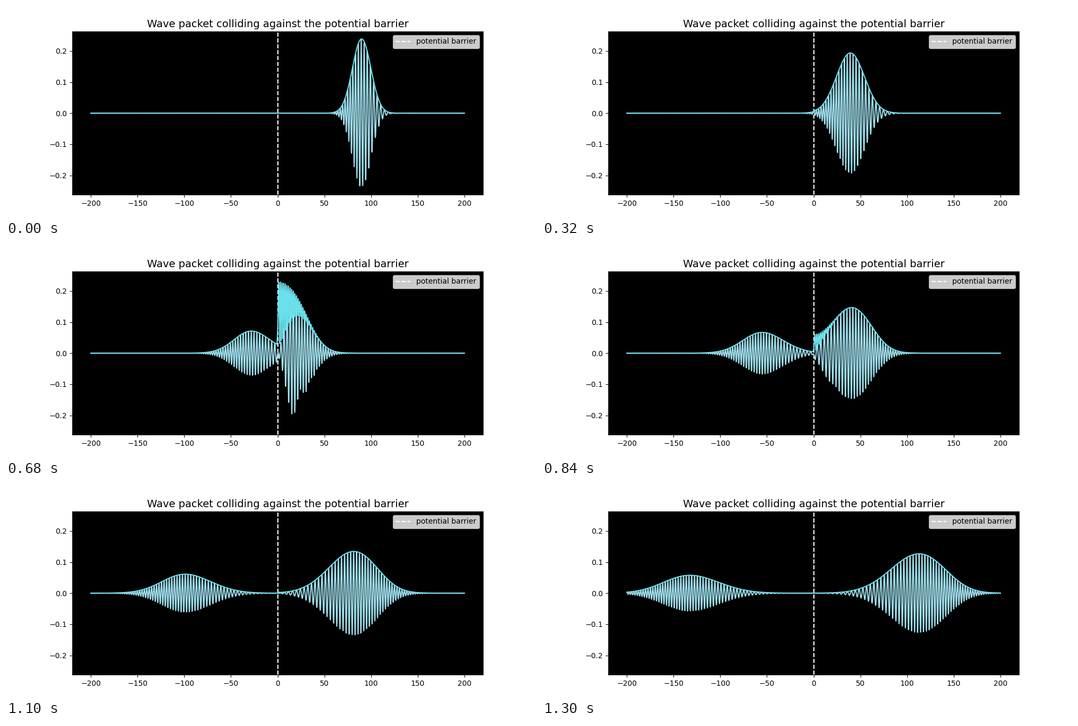
A matplotlib script that plays this animation: 1000x400 px, repeating every 1.32 s.

```python
import numpy as np
import matplotlib.pyplot as plt
from matplotlib.animation import FuncAnimation

FRAMES, INTERVAL = 66, 20

# Packet: start point, mean wave number, variance, overall phase (hbar = m = 1)
X0, K0, VAR, PHASE = 170.0, 2.0, 10.4, 1.28
T_START, DT = 40.0, 1.58
# Square barrier on [-HALF, HALF]
HALF, HEIGHT = 1.0, 2.15


def scattering_states(x, k):
    """Stationary states for waves arriving from the right, one column per k."""
    kappa = np.sqrt(2 * HEIGHT - k**2 + 0j)
    c, s = np.cosh(2 * kappa * HALF), np.sinh(2 * kappa * HALF)
    trans = np.exp(-2j * k * HALF) / (c + 0.5j * (kappa / k - k / kappa) * s)
    refl = -0.5j * trans * (kappa / k + k / kappa) * s

    x = x[:, None]
    depth = np.clip(x, -HALF, HALF) + HALF
    right = np.exp(-1j * k * x) + refl * np.exp(1j * k * x)
    left = trans * np.exp(-1j * k * x)
    inside = trans * np.exp(1j * k * HALF) * (
        np.cosh(kappa * depth) - 1j * k / kappa * np.sinh(kappa * depth))
    return np.where(x > HALF, right, np.where(x < -HALF, left, inside))


x = np.linspace(-200, 200, 2001)
k = np.linspace(1.0, 3.0, 480)
states = scattering_states(x, k)
weights = ((2 * VAR / np.pi) ** 0.25 / np.sqrt(2 * np.pi) * (k[1] - k[0])
           * np.exp(-VAR * (k - K0) ** 2 + 1j * (k * X0 + PHASE)))


def wave(frame):
    t = T_START + DT * frame
    return states @ (weights * np.exp(-0.5j * k**2 * t))


fig, ax = plt.subplots(figsize=(10, 4), dpi=100)
ax.set_facecolor("black")
ax.set_title("Wave packet colliding against the potential barrier", fontsize=14)
ax.axvline(0, color="white", linestyle="--", label="potential barrier")
real_line, = ax.plot([], [], color="#9ddbe8")
envelope, = ax.plot([], [], color="#6bdfeb")
ax.set_xlim(-220, 220)
ax.set_ylim(-0.2622, 0.263)
ax.legend(loc="upper right")


def update(frame):
    psi = wave(frame)
    real_line.set_data(x, psi.real)
    envelope.set_data(x, np.abs(psi))
    return real_line, envelope


anim = FuncAnimation(fig, update, frames=FRAMES, interval=INTERVAL,
                     repeat=True, repeat_delay=0)
plt.show()
```
